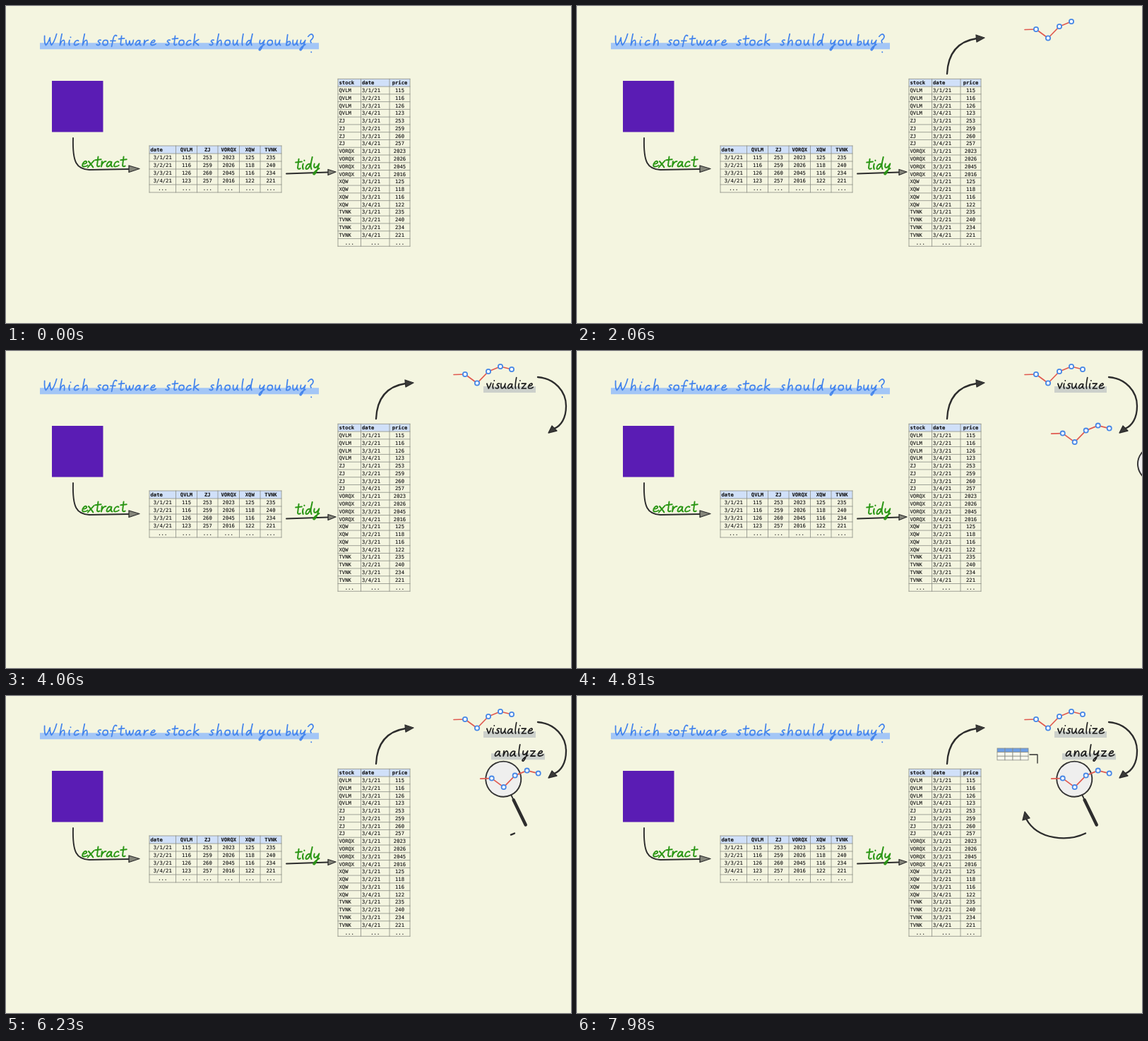
These frames come from a looping animation (800x449 px, 8000 ms). An HTML page:

```html
<!DOCTYPE html>
<html lang="en">
<head>
<meta charset="utf-8">
<title>Which software stock should you buy?</title>
<style>
  html, body { margin: 0; width: 100%; height: 100%; overflow: hidden; background: #f4f5e0; }
  svg { display: block; width: 800px; height: 449px; }
  path { fill: none; stroke-linecap: round; stroke-linejoin: round; }
  text { font: 7.2px "DejaVu Sans Mono", "Liberation Mono", monospace; fill: #151515; stroke: #151515; stroke-width: .12; }
  .head { font-weight: bold; }
  .mid { text-anchor: middle; }
  .rule { stroke: #8b8d85; stroke-width: .8; }
  .ink { stroke: #2d2d2d; stroke-width: 1.9; }
  .bold { stroke-width: 2.3; }
  .tip { fill: #3a3a38; stroke: #2d2d2d; stroke-width: 1.3; }
  .hollow { fill: #85867b; }
  .title { stroke: #4384ec; stroke-width: 2; }
  .green { stroke: #2a9614; stroke-width: 2.1; }
  .black { stroke: #1f1f1f; stroke-width: 2; }
  .marker { stroke-linecap: butt; stroke-width: 9; }
  .blue { stroke: #a3c6f6; }
  .grey { stroke: #ccd0cb; }
  .trend { stroke: #e05a50; stroke-width: 1.7; }
  .node { fill: #fff; stroke: #4888e6; stroke-width: 1.8; }
  .cell { fill: #f8f8ee; stroke: #8b8d86; stroke-width: .8; }
  .cap { fill: #6f9fe4; }
</style>
</head>
<body>
<svg id="stage" viewBox="0 0 800 449" xmlns="http://www.w3.org/2000/svg"></svg>
<script>
const LOOP = 8000, FPS = 12, SHIFT = 24;
const stage = document.getElementById('stage');
const tracks = [];

function add(tag, attrs, parent = stage) {
  const el = document.createElementNS('http://www.w3.org/2000/svg', tag);
  for (const key in attrs) el.setAttribute(key, attrs[key]);
  parent.append(el);
  return el;
}
const path = (d, cls, parent) => add('path', { d, class: cls, pathLength: 1 }, parent);

// Value of [time, value] keys at t, linear between keys.
function at(keys, t) {
  if (t <= keys[0][0]) return keys[0][1];
  for (let i = 1; i < keys.length; i++) {
    const [t0, a] = keys[i - 1], [t1, b] = keys[i];
    if (t < t1) return a + (b - a) * (t - t0) / (t1 - t0);
  }
  return keys[keys.length - 1][1];
}

function show(el, time) {
  tracks.push(t => { el.style.visibility = t >= time - 5 ? 'visible' : 'hidden'; });
}
function draw(el, keys) {
  tracks.push(t => {
    const p = at(keys, t);
    el.style.visibility = p > 0.001 ? 'visible' : 'hidden';
    el.style.strokeDasharray = p < 0.999 ? '1 1' : 'none';
    el.style.strokeDashoffset = p < 0.999 ? 1 - p : 0;
  });
}

// Handwritten letters: strokes above a baseline at 0, and width.
const glyphs = {
  W: ['M0-15Q1-2 4 0Q7-3 9-12Q10-3 13 0Q17-5 19-18', 20],
  a: ['M7-7Q3-9 1-5Q-1 0 2 0Q6-1 7-7Q6 0 9 0', 9],
  b: ['M1-17L1 0Q7 1 7-4Q6-8 1-4', 8],
  c: ['M7-7Q5-9 2-6Q-1 0 3 0Q6 0 8-2', 8],
  d: ['M7-7Q3-9 1-5Q-1 0 2 0Q7-1 8-18Q6-3 9 0', 9],
  e: ['M1-4Q7-4 7-7Q5-10 2-6Q-1 0 4 0Q7 0 9-2', 8],
  f: ['M9-15Q5-18 4-11L3 2M0-7H8', 9],
  h: ['M2-18Q1-9 1 0Q3-8 6-8Q8-8 8 0', 9],
  i: ['M1-8Q0-3 2 0M2-13l.3.3', 3],
  k: ['M1-18L1 0M8-9L2-5L9 0', 9],
  l: ['M1-18Q0-3 2 0', 3],
  n: ['M1-8L1 0Q3-8 5-8Q8-8 8 0', 8],
  o: ['M4-8Q0-8 0-4Q0 0 4 0Q8 0 8-4Q8-8 4-8', 8],
  r: ['M1-8L1 0Q2-8 7-8', 7],
  s: ['M6-8Q2-9 2-6Q6-4 5-1Q3 1 0-1', 6],
  t: ['M4-15L4-2Q5 1 8-1M0-10L9-11', 8],
  u: ['M0-8Q0 0 3 0Q6-1 7-8Q6-1 9 0', 9],
  v: ['M0-8L4 0Q6-4 7-9', 7],
  w: ['M0-8Q1 0 4 0Q6-2 6-7Q7 0 9 0Q12-2 12-8', 12],
  x: ['M0-8Q4-4 8 1M8-9L0 1', 8],
  y: ['M1-8Q0-2 3-2Q6-3 8-8Q6 5 3 8Q0 8 2 5Q4 2 9-1', 9],
  z: ['M0-8H7L1 0H8', 8],
  '?': ['M0-14Q5-21 8-15Q9-11 5-8Q4-6 6-4M8 11l.3.3', 8]
};

function write(word, x, y, gap, cls, scale, from, to) {
  const g = add('g', {
    transform: `translate(${x} ${y}) skewX(-7) scale(${scale})`, role: 'img', 'aria-label': word
  });
  let pen = 0;
  [...word].forEach((ch, i) => {
    const [d, width] = glyphs[ch];
    const letter = path(d, cls, g);
    letter.setAttribute('transform', `translate(${pen} 0)`);
    pen += width + gap;
    if (to) {
      const step = (to - from) / word.length;
      draw(letter, [[from + i * step, 0], [from + (i + 1) * step, 1]]);
    }
  });
}

function table(xs, top, rowHeight, rows, leftCols) {
  const left = xs[0], right = xs[xs.length - 1], bottom = top + rowHeight * rows.length;
  add('rect', { x: left, y: top, width: right - left, height: rowHeight, fill: '#d0e0f9' });
  let rules = xs.map(x => `M${x} ${top}V${bottom}`).join('');
  rows.forEach((row, r) => {
    const y = top + r * rowHeight;
    rules += `M${left} ${y}H${right}`;
    row.forEach((value, c) => {
      const flush = value !== '...' && leftCols(r, c);
      const cls = (r ? '' : 'head ') + (flush ? '' : 'mid');
      const x = flush ? xs[c] + 1.5 : (xs[c] + xs[c + 1]) / 2;
      add('text', { x, y: y + rowHeight / 2 + 2.6, class: cls }).textContent = value;
    });
  });
  path(rules + `M${left} ${bottom}H${right}`, 'rule');
}

const dates = ['3/1/21', '3/2/21', '3/3/21', '3/4/21'];
const prices = {
  QVLM: [115, 116, 126, 123],
  ZJ: [253, 259, 260, 257],
  VORQX: [2023, 2026, 2045, 2016],
  XQW: [125, 118, 116, 122],
  TVNK: [235, 240, 234, 221]
};
const stocks = Object.keys(prices);
const wide = [
  ['date', ...stocks],
  ...dates.map((day, i) => [day, ...stocks.map(s => prices[s][i])]),
  Array(6).fill('...')
];
const tidy = [
  ['stock', 'date', 'price'],
  ...stocks.flatMap(s => dates.map((day, i) => [s, day, prices[s][i]])),
  Array(3).fill('...')
];

// Title
path('M48 56.7H443', 'marker blue');
[['Which', 53, 5.5], ['software', 128, 3.9], ['stock', 226, 3.5],
 ['should', 288, 4.8], ['you', 358, 4.4], ['buy?', 396, 2.8]]
  .forEach(([word, x, gap]) => write(word, x, 55.5, gap, 'title', .88));

// Left part
add('rect', { x: 65, y: 106, width: 72.5, height: 72.5, fill: '#5a1cb4' });
path('M95 187C94 222 100 231 118 232L174 231', 'ink');
path('M174 226L189 230.5L174 235.5Z', 'tip hollow');
write('extract', 107, 227.5, 1.7, 'green', .93);
table([203, 240.5, 270.5, 300, 330.5, 360, 390], 198, 11, wide, (r, c) => !r && !c);
path('M397 237.5L456 235.5', 'ink');
path('M456 231.5L467 235L456 239.5Z', 'tip hollow');
write('tidy', 409, 231, 2.4, 'green', .95);
table([470, 502.5, 543, 572], 103.3, 237 / 22, tidy, (r, c) => c < 2);

// Arrows around the cycle
function arrow(d, tip, keys) {
  draw(path(d, 'ink bold'), keys);
  show(path(tip, 'tip'), keys[keys.length - 1][0]);
}
arrow('M524 96Q526 52 566 46', 'M565 41L577 45L566 51Z',
  [[58, 0], [59, .1], [225, .1], [226, .28], [476, 1]]);
arrow('M753 37C777 39 793 57 793 78C793 95 786 106 776 110', 'M773 106L768 116L780 113Z',
  [[3391, 0], [3392, .05], [3600, .05], [3976, 1]]);
arrow('M720 194.5C696 206 653 205 636 174', 'M631 176L634 164L641 173Z',
  [[6225, 0], [6226, .06], [6600, .06], [7142, 1]]);

// Magnifier
const lens = add('g', {});
add('circle', { r: 25, fill: '#efefee', stroke: '#333', 'stroke-width': 1.9 }, lens);
path('M0 25V34', 'ink', lens);
path('M0 33V72', 'ink', lens).style.strokeWidth = 4.5;
show(lens, 4810);
const lensKeys = [
  [4810, 819, 160, 8], [5226, 819, 160, 8], [5310, 784, 150, 11], [5392, 754, 141, 14],
  [5476, 733, 134, 17], [5559, 719, 129, 19.5], [5642, 710, 124.5, 21.6],
  [5726, 706, 120.5, 24], [5810, 704.3, 117.7, 25.9]
];
const lensAt = (col, t) => at(lensKeys.map(k => [k[0], k[col]]), t);
tracks.push(t => lens.setAttribute('transform',
  `translate(${lensAt(1, t)} ${lensAt(2, t)}) rotate(${-lensAt(3, t)})`));

// Trend charts
const points = [[634, 33.5], [650, 33], [667, 45.5], [683, 29], [700, 22], [716, 26]];
function chart(dx, dy, lineTime, nodeTime) {
  const g = add('g', { transform: `translate(${dx} ${dy})` });
  for (let k = 0; k < 5; k++) {
    show(path(`M${points[k]}L${points[k + 1]}`, 'trend', g), lineTime(k));
  }
  for (let k = 0; k < 5; k++) {
    const [cx, cy] = points[k + 1];
    show(add('circle', { cx, cy, r: 3.1, class: 'node' }, g), nodeTime(k));
  }
}
chart(0, 0, k => k ? 1150 + 250 * k : 650, k => 1310 + 250 * k);
chart(37.7, 83.6, k => 4140 + 125 * k, k => 4225 + 125 * k);

// Cycle labels
draw(path('M676 54.5H750', 'marker grey'), [[2500, 0], [3390, 1]]);
write('visualize', 680, 53, 2.6, 'black', .85, 2300, 3320);
draw(path('M687 85.7H763', 'marker grey'), [[5400, 0], [6140, 1]]);
write('analyze', 692, 85, 3.5, 'black', .9, 5310, 5888);

// Small table and its connector
for (let c = 0; c < 4; c++) {
  const g = add('g', {});
  for (let r = 0; r < 3; r++) {
    add('rect', { x: 595 + c * 11, y: 74 + r * 5.6, width: 11, height: 5.6, class: r ? 'cell' : 'cell cap' }, g);
  }
  show(g, 7480 + c * 83);
}
const link = path('M641 83H652V95', 'ink');
link.style.strokeWidth = 1.3;
draw(link, [[7810, 0], [7976, 1]]);

function frame() {
  const now = performance.now() % LOOP;
  const t = Math.floor((now + SHIFT) * FPS / 1000) * 1000 / FPS - SHIFT;
  tracks.forEach(track => track(t));
  requestAnimationFrame(frame);
}
frame();
</script>
</body>
</html>
```
